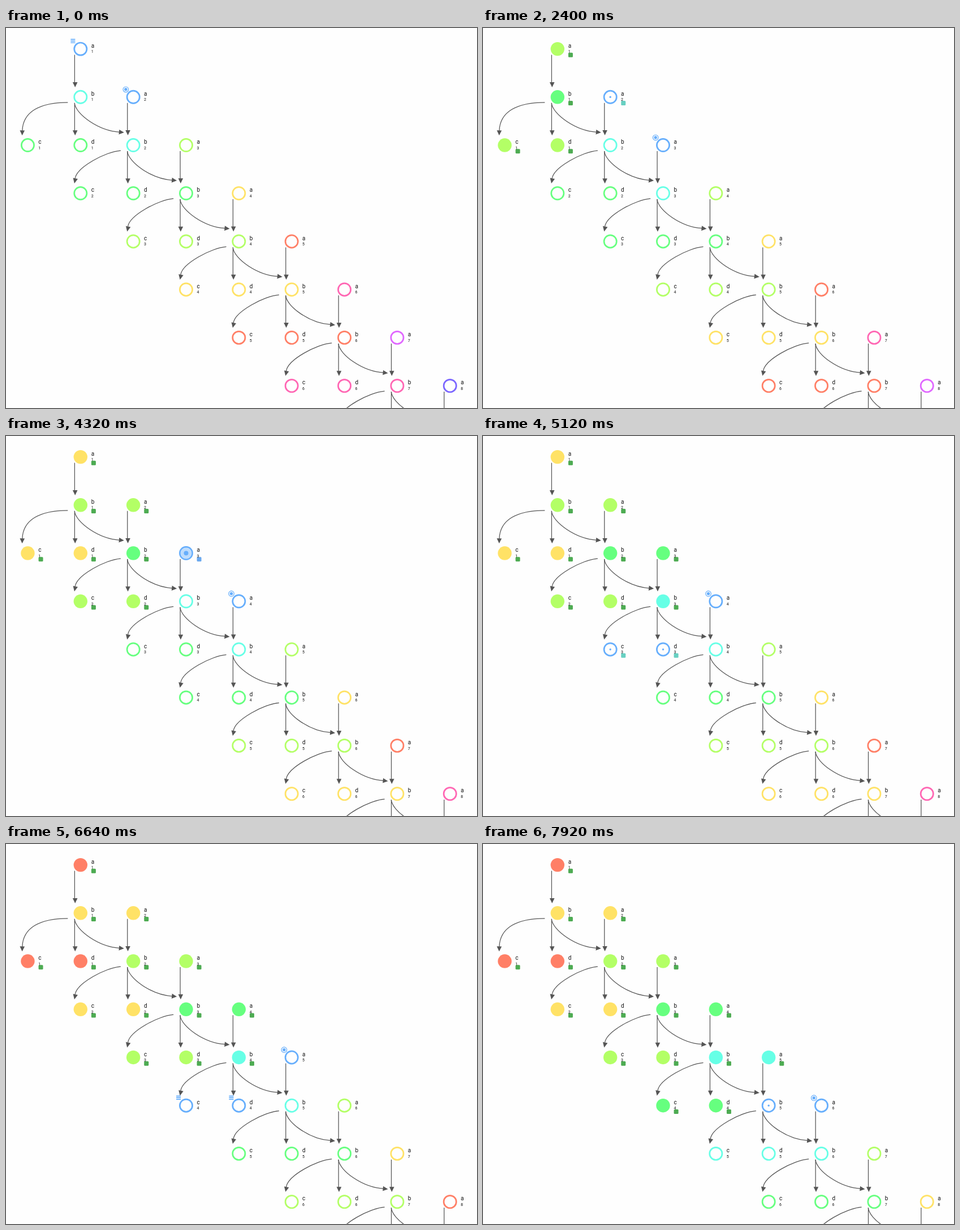
Write an HTML page that moves like this. It is 833 by 673 pixels and loops after 8 s.

```html
<!DOCTYPE html>
<html lang="en">
<head>
<meta charset="utf-8">
<title>Task graph</title>
<style>
html, body { margin: 0; width: 100%; height: 100%; overflow: hidden; background: #fefefe; }
svg { display: block; width: 100%; height: 100%; }
text { font-family: Roboto, sans-serif; fill: #111; }
.name { font-size: 10px; }
.cycle { font-size: 7px; }
.line { fill: none; stroke: #555; stroke-width: 1.25; }
.head { fill: #555; }
</style>
</head>
<body>
<svg id="stage" viewBox="0 0 833 673"></svg>
<script>
const LOOP = 8000, CYCLES = 8, DX = 93.35, DY = 85.22;
// Colour by distance from the nearest active task
const COLORS = ['#66aefc', '#66ffe6', '#66ff7f', '#b3ff66', '#ffe266',
  '#ff7f66', '#ff66b3', '#e066ff', '#7b66ff'];
const JOB = { submitted: '#68d0c2', running: '#6aa8ee', done: '#4dab52' };
const STATES = ['waiting', 'preparing', 'submitted', 'running', 'done'];

// Stages run one after another: a, b, then c and d together.
// Start times of the five states; an optional sixth is when d is done.
const STAGES = [
  [0, 560, 680, 880, 1040], [1080, 1120, 1200, 1360, 1560], [1600, 1680, 1800, 1960, 2120],
  [2200, 2280, 2400, 2560, 2760], [2800, 2880, 2960, 3120, 3280], [3320, 3400, 3480, 3600, 3720, 3840],
  [3880, 3960, 4040, 4200, 4360], [4400, 4440, 4520, 4680, 4880], [4920, 5000, 5120, 5280, 5440],
  [5520, 5560, 5600, 5680, 5800], [5840, 5920, 6120, 6360, 6560], [6600, 6680, 6760, 6920, 7080],
  [7160, 7240, 7400, 7600, 7800], [7840, 7920]
];

const stage = document.getElementById('stage');

function el(tag, attrs, parent = stage) {
  const e = document.createElementNS('http://www.w3.org/2000/svg', tag);
  for (const k in attrs) e.setAttribute(k, attrs[k]);
  return parent.appendChild(e);
}

function show(e, on) { e.setAttribute('visibility', on ? 'visible' : 'hidden'); }

function arrow(path, x, y, angle, parent) {
  el('path', { class: 'line', d: path }, parent);
  el('path', { class: 'head', d: 'M0 0L-9 -4.3V4.3Z', transform: `translate(${x} ${y}) rotate(${angle})` }, parent);
}

function drawEdges(n) {
  const g = el('g', { transform: `translate(${131.8 + DX * (n - 1)} ${122.3 + DY * (n - 1)})` });
  arrow('M-10.4 -74.8V-25', -9.6, -17.4, 90, g);
  arrow('M-10.4 10.5V60', -9.6, 67.9, 90, g);
  arrow('M-10.6 10.5C-8.6 31 33 60 69 62', 77, 62.8, 6, g);
  if (n === 1) arrow('M-22.5 9.5C-72 9.5 -102 26 -103 60', -103.2, 68, 91, g);
  else arrow('M-22.3 9.5C-49 11.5 -100 39 -103 59', -104.2, 67.7, 102, g);
}

function makeTask(name, n) {
  const col = name === 'c' ? n - 1 : n;
  const row = { a: n - 1, b: n, c: n + 1, d: n + 1 }[name];
  const g = el('g', { transform: `translate(${38.45 + DX * col} ${37.1 + DY * row})` });
  const blue = COLORS[0];
  const task = { name, n, order: (n - 1) * 3 + Math.min('abcd'.indexOf(name), 2) };
  task.disc = el('circle', {}, g);
  task.glow = el('circle', { r: 9.8, fill: '#bedcfc' }, g);
  task.dot = el('circle', { fill: blue }, g);
  task.queued = el('path', { d: 'M-17.4 -16.9h8M-17.4 -14h8M-17.4 -11.1h8', stroke: blue, 'stroke-width': 1.7 }, g);
  task.held = el('g', { transform: 'translate(-13.3 -13.5)' }, g);
  el('circle', { r: 4.8, fill: '#fefefe', stroke: blue, 'stroke-width': 1.2 }, task.held);
  el('circle', { r: 2.7, fill: blue }, task.held);
  task.job = el('rect', { x: 19.1, y: 6.7, width: 8, height: 8, rx: 1.5 }, g);
  el('text', { class: 'name', x: 18.9, y: -2.4 }, g).textContent = name;
  el('text', { class: 'cycle', x: 18.9, y: 7.1 }, g).textContent = n;
  return task;
}

const tasks = [], byId = {};
for (let n = 1; n <= CYCLES; n++) drawEdges(n);
for (let n = 1; n <= CYCLES; n++) {
  for (const name of 'abcd') {
    const task = byId[name + n] = makeTask(name, n);
    task.near = [];
    tasks.push(task);
  }
}

function link(p, q) {
  if (p && q) { p.near.push(q); q.near.push(p); }
}
for (const t of tasks) if (t.name !== 'b') link(t, byId['b' + t.n]);
for (let n = 1; n < CYCLES; n++) link(byId['b' + n], byId['b' + (n + 1)]);

function stateOf(task, t) {
  const times = STAGES[task.order];
  if (times && t >= times[0]) {
    const done = task.name === 'd' && times[5] || times[4];
    if (t >= done) return 'done';
    return STATES[times.slice(0, 4).filter(v => t >= v).length - 1];
  }
  // The next cycle's first task is held back while the current one runs
  const prev = STAGES[task.order - 3];
  return task.name === 'a' && prev && t >= prev[0] ? 'held' : 'idle';
}

function isActive(task, t) {
  const next = STAGES[task.order + 1];
  return task.state !== 'idle' && !(next && t >= next[0]);
}

function spread(t) {
  const queue = tasks.filter(task => {
    task.dist = isActive(task, t) ? 0 : -1;
    return task.dist === 0;
  });
  for (const task of queue) {
    for (const q of task.near) {
      if (q.dist < 0) { q.dist = task.dist + 1; queue.push(q); }
    }
  }
}

function render(t) {
  for (const task of tasks) task.state = stateOf(task, t);
  spread(t);
  for (const task of tasks) {
    const s = task.state, done = s === 'done', running = s === 'running';
    const color = COLORS[Math.min(task.dist, COLORS.length - 1)];
    task.disc.setAttribute('r', done ? 12.2 : 11.1);
    task.disc.setAttribute('fill', done ? color : '#fefefe');
    task.disc.setAttribute('stroke', done ? 'none' : color);
    task.disc.setAttribute('stroke-width', 2.7);
    task.dot.setAttribute('r', running ? 4 : 1.7);
    show(task.glow, running);
    show(task.dot, running || s === 'preparing' || s === 'submitted');
    show(task.queued, s === 'waiting');
    show(task.held, s === 'held');
    show(task.job, s in JOB);
    task.job.setAttribute('fill', JOB[s] || 'none');
  }
}

const start = performance.now();
function frame() {
  render((performance.now() - start) % LOOP);
  requestAnimationFrame(frame);
}
frame();
</script>
</body>
</html>
```
